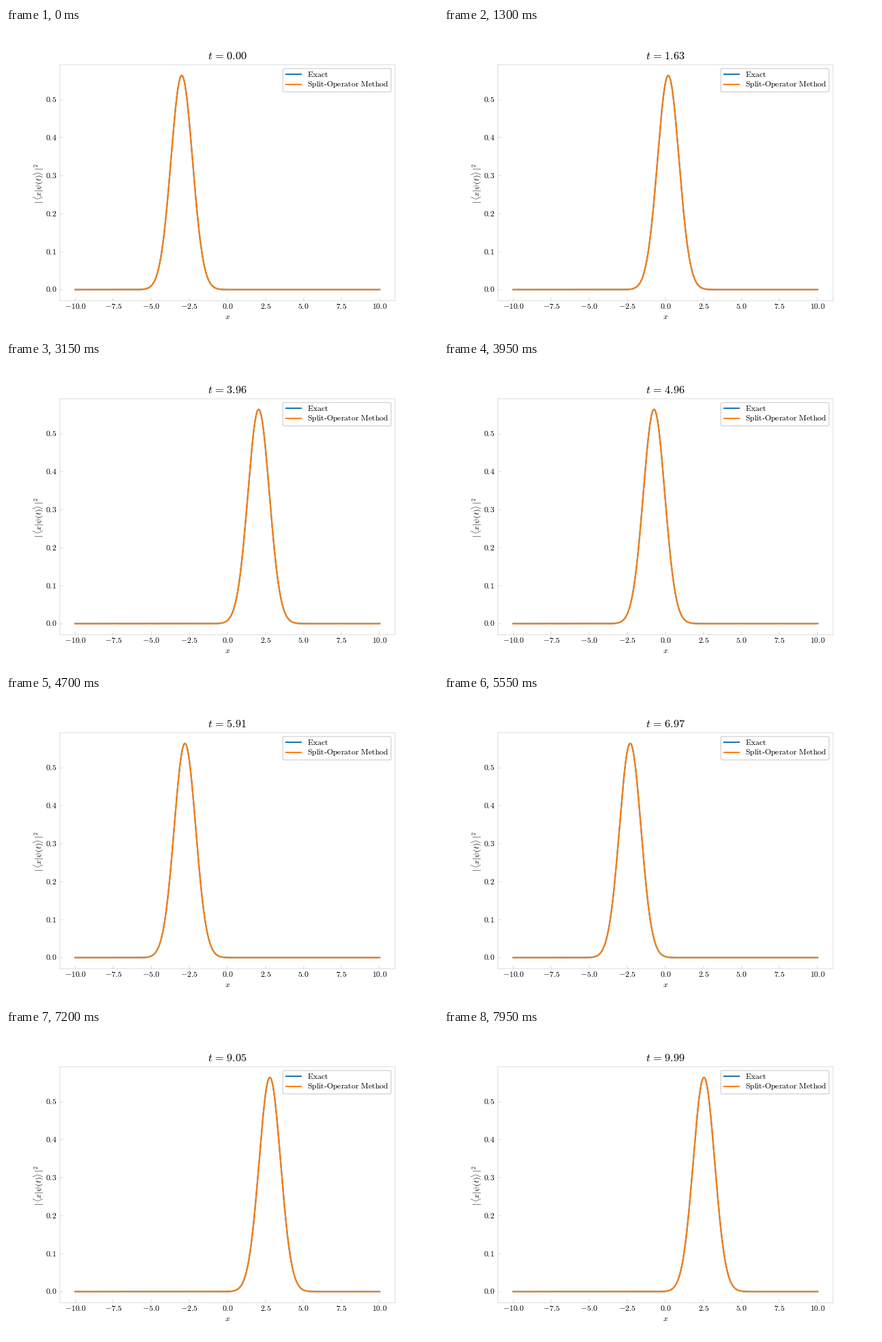
Write a matplotlib script that moves like this. It is 634 by 450 pixels and loops after 8 s.

```python
import numpy as np
import matplotlib.pyplot as plt
from matplotlib.animation import FuncAnimation
from matplotlib.lines import Line2D
from matplotlib.patches import FancyBboxPatch

W, H, DPI = 634, 450, 100
FRAMES, INTERVAL = 160, 50
DT = 2 * np.pi / 100
X0 = -3.0
BLUE, ORANGE = "#1f77b4", "#ff7f0e"
SMALL, LARGE = 8.5, 11.75

plt.rcParams["mathtext.fontset"] = "cm"
fig = plt.figure(figsize=(W / DPI, H / DPI), dpi=DPI, facecolor="white")
ax = fig.add_axes([0.125, 0.11, 0.775, 0.77])


def write(x, y, math, size=SMALL, **kw):
    """Put math text with its baseline at pixel (x, y), y counted from the top."""
    kw = {"ha": "center", "va": "baseline", **kw}
    return fig.text(x / W, 1 - y / H, f"${math}$", fontsize=size, **kw)


def density(t):
    """Coherent state of the harmonic oscillator."""
    return np.exp(-(x - X0 * np.cos(t)) ** 2) / np.sqrt(np.pi)


def title_text(t):
    return rf"$t\hspace{{0.117}}=\hspace{{0.117}}{t:.2f}$"


# axes
peak = 1 / np.sqrt(np.pi)
ax.set_xlim(-11, 11)
ax.set_ylim(-0.05 * peak, 1.05 * peak)
ax.set_xticks(np.arange(-10, 10.1, 2.5))
ax.set_yticks(np.arange(0, 0.55, 0.1))
ax.tick_params(direction="in", width=0.1, length=3.5,
               labelbottom=False, labelleft=False)
for spine in ax.spines.values():
    spine.set_linewidth(0.1)

for v in ax.get_xticks():
    px = ax.transData.transform((v, 0))[0]
    write(px, 413, f"{v:.1f}")
for v in ax.get_yticks():
    py = H - ax.transData.transform((0, v))[1]
    write(74.4, py + 3.7, f"{v:.1f}", ha="right")

write(325, 428, "x")
write(51.5, 228.5, r"|\hspace{0.19}\langle x|\psi(t)\rangle\hspace{0.19}|^2",
      rotation=90, rotation_mode="anchor")
title = write(325, 45.7, "t", LARGE)

# curves
x = np.linspace(-10, 10, 1000)
curves = [ax.plot(x, density(0), color=c, lw=1.5)[0] for c in (BLUE, ORANGE)]

# legend
fig.add_artist(FancyBboxPatch(
    (406.3, H - 94), 158.8, 34.4, boxstyle="round,pad=0,rounding_size=2.2",
    transform=None, fc="white", ec="0.8", lw=1, alpha=0.8))
rows = [(68.3, 72.3, BLUE, r"\mathrm{Exact}"),
        (83, 86.5, ORANGE,
         "\\mathrm{Split\u2010Operator\\hspace{0.38}Method}")]
for line_y, base, color, label in rows:
    fig.add_artist(Line2D([410.7, 432.9], [H - line_y] * 2, transform=None,
                          color=color, lw=1.5, solid_capstyle="projecting"))
    write(441.8, base, label, ha="left")


def update(i):
    t = i * DT
    title.set_text(title_text(t))
    for curve in curves:
        curve.set_ydata(density(t))
    return [title, *curves]


anim = FuncAnimation(fig, update, frames=FRAMES, interval=INTERVAL,
                     init_func=lambda: update(0), repeat=True, repeat_delay=0)
plt.show()
```
